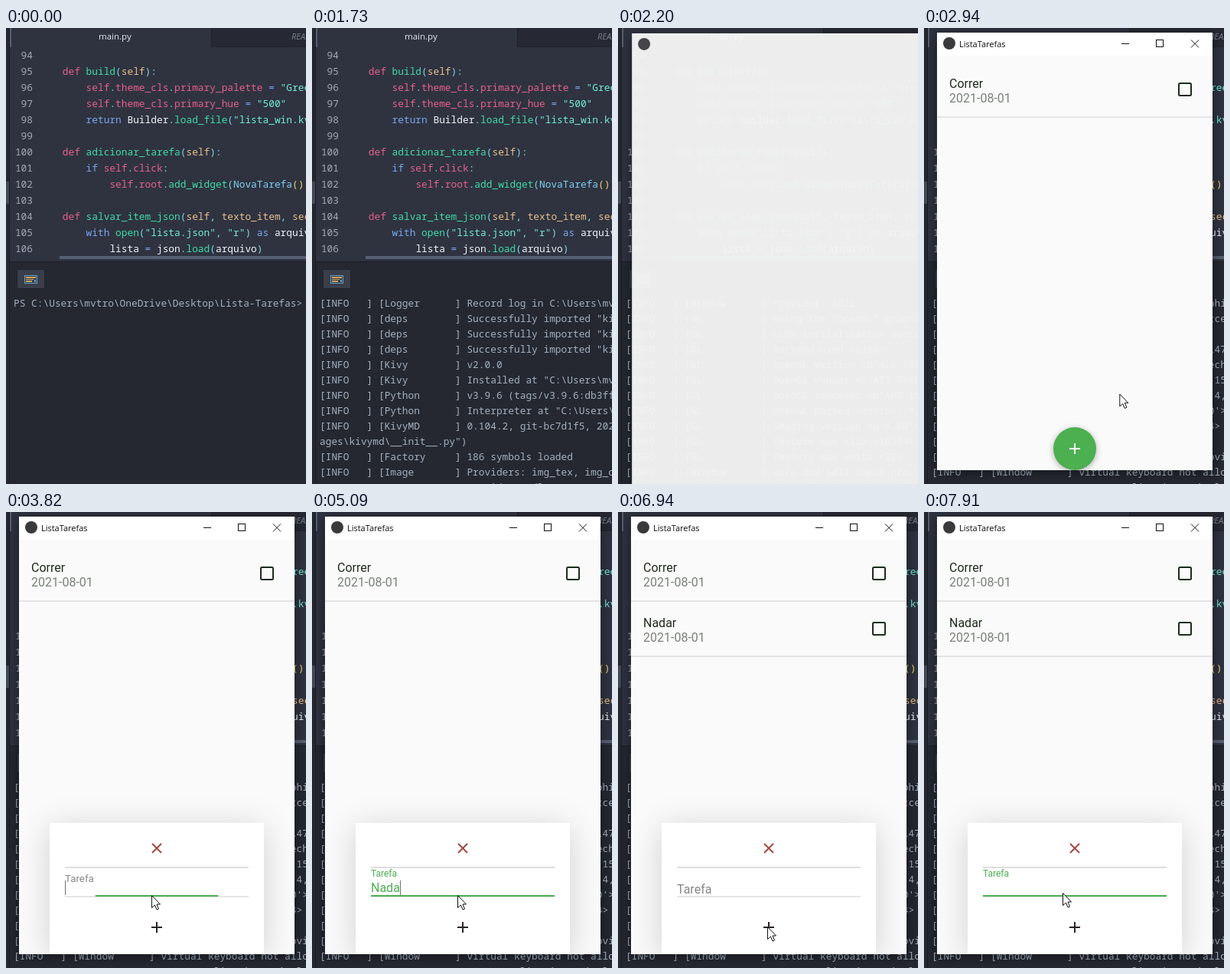
Write an HTML page with a canvas that moves like this. It is 392 px wide and 594 px high and loops after 8000 ms.

```html
<!DOCTYPE html>
<html lang="pt">
<head>
<meta charset="utf-8">
<title>Lista de tarefas</title>
<style>
html, body { margin: 0; width: 100%; height: 100%; overflow: hidden; background: #252831; }
canvas { display: block; }
</style>
</head>
<body>
<canvas id="stage" width="392" height="594"></canvas>
<script>
const ctx = document.getElementById('stage').getContext('2d');
const LOOP = 8000;
const MONO = '12.83px "Noto Sans Mono", monospace';
const roboto = size => `${size}px Roboto, sans-serif`;
const GREEN = '#4caf50', INK = '#212121';

// Code lines: parts split by "|", each starting with a colour key.
const TINT = { p: '#e8608f', b: '#7aa7f0', g: '#40dcaa', c: '#7fd8e8', o: '#e8c08a',
  w: '#f0f3f8', s: '#72ecd8', y: '#f2d468', k: '#7cd0f2' };
const CODE = [
  '',
  'w    |pdef |gbuild|c(|oself|c):',
  'w        |pself|c.|ptheme_cls|c.|pprimary_palette |b= |s"Green"',
  'w        |pself|c.|ptheme_cls|c.|pprimary_hue |b= |s"500"',
  'w        |breturn |wBuilder|c.|gload_file|c(|s"lista_win.kv"',
  '',
  'w    |pdef |gadicionar_tarefa|c(|oself|c):',
  'w        |bif |pself|c.|pclick|c:',
  'w            |pself|c.|proot|c.|gadd_widget|c(|kNovaTarefa|y()|c)',
  '',
  'w    |pdef |gsalvar_item_json|c(|oself|c, |otexto_item|c, |osec',
  'w        |bwith |gopen|c(|s"lista.json"|c, |s"r"|c) |bas |warquivo',
  'w            |wlista |b= |wjson|c.|gload|c(|warquivo|c)'
];

const info = (source, message) => `[INFO   ] [${source.padEnd(12)}] ${message}`;
const LOG = [
  'PS C:\\Users\\mvtro\\OneDrive\\Desktop\\Lista-Tarefas>',
  info('Logger', 'Record log in C:\\Users\\mvtro'),
  ...Array(3).fill(info('deps', 'Successfully imported "kivy')),
  info('Kivy', 'v2.0.0'),
  info('Kivy', 'Installed at "C:\\Users\\mvtro'),
  info('Python', 'v3.9.6 (tags/v3.9.6:db3ff'),
  info('Python', 'Interpreter at "C:\\Users\\mvtro'),
  info('KivyMD', '0.104.2, git-bc7d1f5, 202'),
  'ages\\kivymd\\__init__.py")',
  info('Factory', '186 symbols loaded'),
  info('Image', 'Providers: img_tex, img_d'),
  info('Text', 'Provider: sdl2'),
  info('Window', 'Provider: sdl2'),
  ...['Using the "OpenGL" graphics', 'GLEW initialization succeeded', 'Backend used <glew>',
    "OpenGL version <b'4.6.147", "OpenGL vendor <b'ATI Tech", "OpenGL renderer <b'AMD 15",
    'OpenGL parsed version: 4, 6', "Shading version <b'4.60'>", 'Texture max size <16384>',
    'Texture max units <32>'].map(m => info('GL', m)),
  info('Window', 'auto add sdl2 input provider'),
  info('Window', 'virtual keyboard not allowed'),
  info('Base', 'Start application main loop')
];
const LOG_COUNTS = [[0, 1], [1260, 2], [1370, 5], [1480, 9], [1590, 13], [1730, 14],
  [1990, 26], [2120, 27], [2250, 28]];

// Bursts of motion run at about 15 steps a second: start, end, step count.
const BURSTS = [[1990, 2730, 12], [2810, 3560, 12], [3630, 3945, 6], [5500, 6240, 12],
  [6320, 6460, 3], [6600, 6740, 3], [6940, 7570, 10]];
const POINTER = [[2810, 262, 470], [3150, 198, 541], [3420, 198, 541], [3700, 190, 500],
  [5500, 190, 500], [5980, 195, 541], [6940, 195, 541], [7360, 181, 497]];
const KEYS = [4560, 4830, 4960, 5090, 5290];
const ADDED = 6170;

const clamp = v => Math.max(0, Math.min(1, v));
const mix = (a, b, p) => a + (b - a) * p;
const between = (t, a, b) => t >= a && t < b;
const outQuad = p => 1 - (1 - p) ** 2;

function stepTime(t) {
  const burst = BURSTS.filter(b => t >= b[0]).pop();
  if (!burst) return t;
  const [start, end, count] = burst, step = (end - start) / (count - 1);
  return t < end ? start + Math.floor((t - start) / step) * step : t;
}

function rect(x, y, w, h, color) {
  ctx.fillStyle = color;
  ctx.fillRect(x, y, w, h);
}
function circle(x, y, r, color) {
  ctx.fillStyle = color;
  ctx.beginPath();
  ctx.arc(x, y, r, 0, Math.PI * 2);
  ctx.fill();
}
function text(str, x, y, font, color) {
  ctx.font = font;
  ctx.fillStyle = color;
  ctx.fillText(str, x, y);
}
function lines(color, width, ...segments) {
  ctx.strokeStyle = color;
  ctx.lineWidth = width;
  ctx.beginPath();
  for (const [x1, y1, x2, y2] of segments) {
    ctx.moveTo(x1, y1);
    ctx.lineTo(x2, y2);
  }
  ctx.stroke();
}
function shadowRect(x, y, w, h, color, shade, blur, dy) {
  ctx.save();
  ctx.shadowColor = shade;
  ctx.shadowBlur = blur;
  ctx.shadowOffsetY = dy;
  rect(x, y, w, h, color);
  ctx.restore();
}
const plus = (x, y, color) => lines(color, 2, [x - 7, y, x + 7, y], [x, y - 7, x, y + 7]);

function drawEditor() {
  rect(0, 0, 392, 594, '#252831');
  rect(5, 0, 387, 304, '#2f3340');
  rect(269, 0, 123, 25, '#262933');
  rect(268, 0, 1, 25, '#20232b');
  rect(269, 24, 123, 1, '#20232b');
  rect(4, 0, 1, 594, '#1b1d24');
  rect(5, 0, 2, 25, '#596070');
  rect(0, 200, 4, 29, '#454a56');
  text('main.py', 121, 15, '11.5px "Open Sans", sans-serif', '#e4e8ef');
  text('README.md', 373, 15, 'italic 11px "Open Sans", sans-serif', '#7b8290');
  CODE.forEach((line, i) => {
    const y = 39.5 + i * 21;
    const number = String(94 + i);
    text(number, 35 - number.length * 7.7, y, MONO, '#a3a9b5');
    let x = 43;
    for (const part of line ? line.split('|') : []) {
      text(part.slice(1), x, y, MONO, TINT[part[0]]);
      x += (part.length - 1) * 7.698;
    }
  });
  rect(70, 297, 322, 4, '#566073');
  rect(5, 304, 387, 1, '#1b1d24');
}

function drawTerminal(t) {
  rect(15, 315, 35, 24, '#393e4a');
  ctx.strokeStyle = '#20232b';
  ctx.lineWidth = 1;
  ctx.strokeRect(14.5, 314.5, 36, 25);
  ctx.strokeStyle = '#5fa3c4';
  ctx.strokeRect(24.5, 322.5, 16, 10);
  rect(26, 324, 13, 2, '#d0a060');
  rect(26, 327, 10, 1, '#d0a060');
  rect(26, 329, 8, 2, '#d0a060');
  rect(37, 328, 2, 3, '#5fa3c4');

  const count = LOG_COUNTS.filter(c => t >= c[0]).pop()[1];
  const first = Math.max(0, count - 13);
  LOG.slice(first, count).forEach((line, i) =>
    text(line, 10, 362.5 + i * 20, MONO, '#a5b1c1'));
}

function drawTask(name, y) {
  text(name, 33, y + 78, roboto(16), '#1f2a1f');
  text('2021-08-01', 33, y + 97, roboto(16), '#7a807a');
  ctx.strokeStyle = '#1d2c1d';
  ctx.lineWidth = 2;
  ctx.beginPath();
  ctx.roundRect(333, y + 72, 16, 16, 1.5);
  ctx.stroke();
  rect(17, y + 115, 360, 2, '#e4e4e4');
}

function drawAddButton(t) {
  ctx.save();
  ctx.shadowColor = 'rgba(0,0,0,.3)';
  ctx.shadowBlur = 8;
  ctx.shadowOffsetY = 2;
  circle(197, 548, 28, GREEN);
  ctx.restore();
  const p = clamp((t - (t < 5000 ? 3200 : 6300)) / 220);
  if (p > 0) circle(197, 548, 28 * outQuad(p), 'rgba(255,255,255,.25)');
  plus(197, 548, '#ffffff');
}

function drawCard(t) {
  shadowRect(57, 405, 280, 171, '#ffffff', 'rgba(0,0,0,.17)', 40, 6);
  lines('#a34a43', 2, [191, 432, 203, 444], [203, 432, 191, 444]);
  rect(77, 462, 240, 2, '#dedede');
  rect(77, 500, 240, 2, '#e6e6e6');

  const focusAt = t < ADDED ? 3734 : 7350;
  const p = outQuad(clamp((t - focusAt) / 200));
  const active = t >= focusAt + 140;
  rect(197 - 120 * p, 499, 240 * p, 2, GREEN);
  text('Tarefa', 77, mix(496.5, 475, p), roboto(mix(16, 12, p)), active ? GREEN : '#858585');

  const typed = t < ADDED ? 'Nadar'.slice(0, KEYS.filter(k => t >= k).length) : '';
  text(typed, 77, 495, roboto(16), GREEN);
  if (between(t, 3734, 4290) || between(t, 4560, 5500) || between(t, 7350, 7910)) {
    const width = typed ? ctx.measureText(typed).width : 0;
    rect(77 + Math.round(width), 480, 1, 19, '#707070');
  }
  plus(197, 541, '#2a2428');
}

function drawPointer(t) {
  if (t < POINTER[0][0]) return;
  const i = POINTER.filter(k => t >= k[0]).length - 1;
  const a = POINTER[i], b = POINTER[i + 1] || a;
  const p = b === a ? 0 : (t - a[0]) / (b[0] - a[0]);
  const s = p * p * (3 - 2 * p);
  ctx.save();
  ctx.translate(mix(a[1], b[1], s) + .5, mix(a[2], b[2], s) - .5);
  ctx.beginPath();
  for (const [x, y] of [[0, 0], [0, 16], [4, 12.5], [6.5, 18.5], [9, 17.5], [6.5, 11.5], [11, 11.5]])
    ctx.lineTo(x, y);
  ctx.closePath();
  ctx.fillStyle = '#fff';
  ctx.fill();
  ctx.strokeStyle = '#111';
  ctx.lineWidth = 1;
  ctx.stroke();
  ctx.restore();
}

function drawWindow(t) {
  if (t < 1994) return;
  const fade = t < 2400 ? Math.exp(-(t - 1994) / 72) : 0;
  const wide = t < 2410;
  const width = wide ? 800 : 360, height = wide ? 638 : 570;
  const scale = 1 - .046 * fade;
  ctx.save();
  ctx.globalAlpha = 1 - fade;
  ctx.translate(417, 325);
  ctx.scale(scale, scale);
  ctx.translate(-417, -325);
  shadowRect(17, 6, width, height, wide ? '#fbfbfb' : '#fafafa', 'rgba(0,0,0,.45)', 16, 3);
  if (t >= 2250) {
    rect(17, 6, width, 30, '#ffffff');
    text('ListaTarefas', 46, 24.5, '11px "Open Sans", sans-serif', '#111');
  }
  circle(33, 20, 8, '#3a3a3c');
  if (!wide) {
    lines('#111', 1, [258, 20.5, 268, 20.5], [349, 15.5, 359, 25.5], [359, 15.5, 349, 25.5]);
    ctx.strokeRect(303.5, 15.5, 9, 9);
    ctx.beginPath();
    ctx.rect(17, 36, 360, 540);
    ctx.clip();
    if (t >= 2540) {
      drawTask('Correr', 0);
      if (t >= ADDED) drawTask('Nadar', 72);
      if (between(t, 3410, ADDED) || t >= 6600) drawCard(t);
      else drawAddButton(t);
    }
  }
  ctx.restore();
}

function draw(now) {
  const t = stepTime(now % LOOP);
  drawEditor();
  drawTerminal(t);
  drawWindow(t);
  drawPointer(t);
  requestAnimationFrame(draw);
}
requestAnimationFrame(draw);
</script>
</body>
</html>
```
